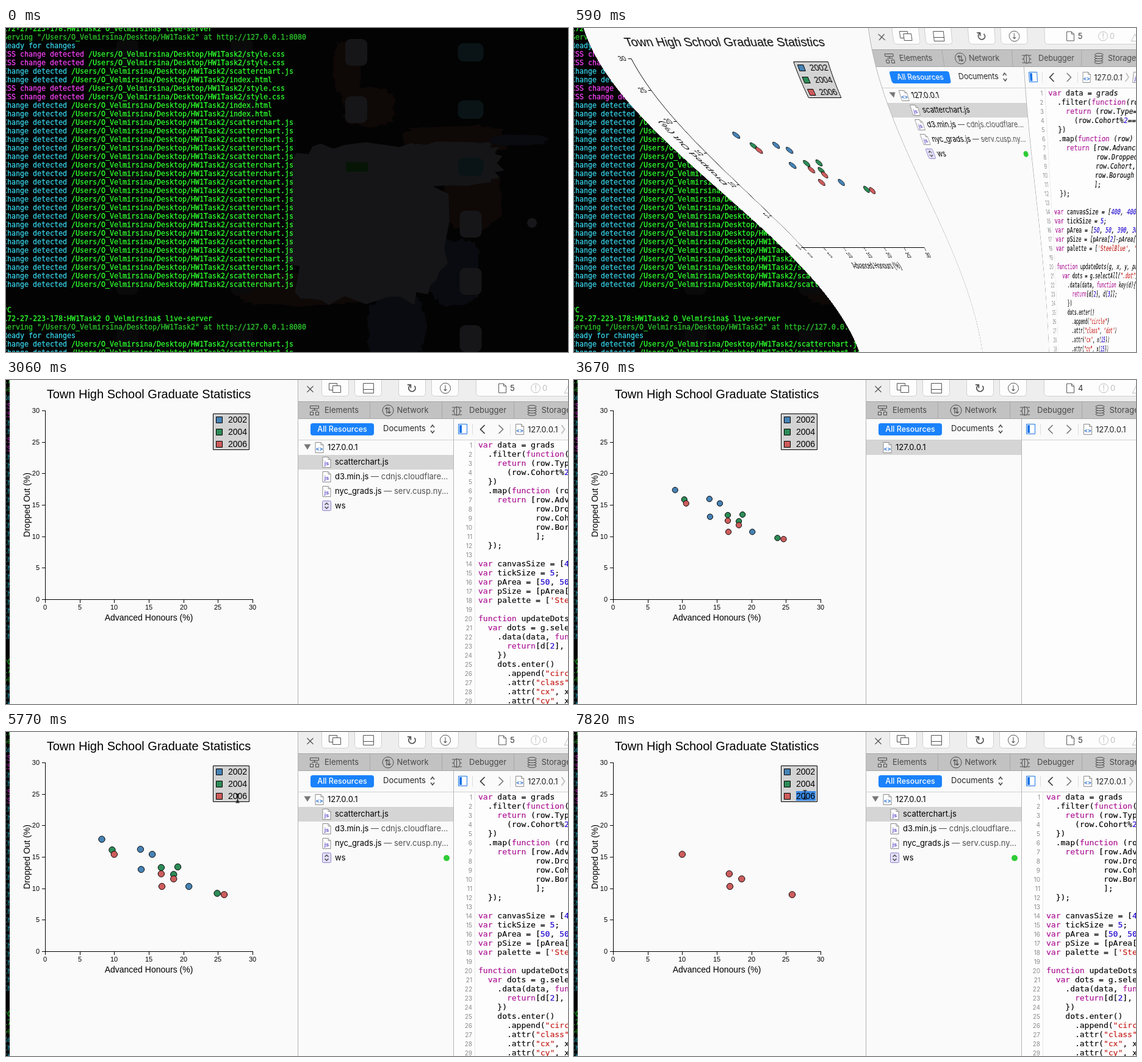
Animation, 921 px wide and 532 px high, one loop 8000 ms. Source, as an HTML page with a canvas:

```html
<!DOCTYPE html>
<html lang="en">
<head>
<meta charset="utf-8">
<title>Scatter chart demo</title>
<style>
html, body { margin: 0; width: 100%; height: 100%; overflow: hidden; background: #000; }
canvas { display: block; width: 921px; height: 532px; }
</style>
</head>
<body>
<canvas id="stage" width="921" height="532"></canvas>
<script>
const W = 921, H = 532, LOOP = 8000;
const LEFT = 6, RIGHT = 1231, DOCK = 812; // window edges and the axis it unfolds from
const SPLIT = 479, CODE_X = 734;          // inspector panes
const HELV = '"Liberation Sans", Arial, sans-serif';
const UI = '13px Inter, sans-serif';
const MONO = '"DejaVu Sans Mono", monospace';
const SIGNS = '"DejaVu Sans", sans-serif';

// Hard changes, in ms
const PEEK = 320, UNFOLD = 590, OPEN = 800, SHADE = 1100;
const RELOAD = 2920, CLEARED = 3210, LISTED = 3970, LOADED = 4120, CONNECTED = 4290;
const FILTER = 5700, SELECTED = 7810;

const stage = document.getElementById('stage').getContext('2d');
const makeLayer = width => {
  const c = document.createElement('canvas');
  c.width = width;
  c.height = H;
  return c.getContext('2d');
};
const terminal = makeLayer(W);
const win = makeLayer(RIGHT);
let g = win;

// ---- drawing helpers ----
function text(str, x, y, font, color = '#000', align = 'left') {
  g.font = font;
  g.fillStyle = color;
  g.textAlign = align;
  g.fillText(str, x, y);
}
// Draws [string, colour] parts one after another
function run(parts, x, y, font, weight = 0) {
  for (const [str, color] of parts) {
    text(str, x, y, font, color);
    if (weight) {
      g.strokeStyle = color;
      g.lineWidth = weight;
      g.strokeText(str, x, y);
    }
    x += g.measureText(str).width;
  }
}
function paint(fill, line, width = 1) {
  if (fill) { g.fillStyle = fill; g.fill(); }
  if (line) { g.strokeStyle = line; g.lineWidth = width; g.stroke(); }
}
function box(x, y, w, h, fill, line, radius = 0) {
  g.beginPath();
  g.roundRect(x, y, w, h, radius);
  paint(fill, line);
}
function disc(x, y, r, fill, line, squash = 1) {
  g.beginPath();
  g.ellipse(x, y, r, r * squash, 0, 0, 7);
  paint(fill, line);
}
function poly(points, line, width = 1, fill) {
  g.beginPath();
  points.forEach(p => g.lineTo(...p));
  paint(fill, line, width);
}
const hline = (x1, x2, y, color) => poly([[x1, y + .5], [x2, y + .5]], color);
const vline = (x, y1, y2, color) => poly([[x + .5, y1], [x + .5, y2]], color);
// Tip points along x by dx, or along y by dy
const chevronX = (x, y, dx, color) => poly([[x - dx, y - 7], [x + dx, y], [x - dx, y + 7]], color, 1.7);
const chevronY = (x, y, dy) => poly([[x - 3, y - dy], [x, y + dy], [x + 3, y - dy]], '#444', 1.4);

// ---- terminal ----
const HOME = '/Users/O_Velmirsina/Desktop/HW1Task2';
const GREEN = '#2eff2e', DIM = '#2cc42c', CYAN = '#36cfe4', PINK = '#f040f0';

function seeded(seed) {
  return () => (seed = seed * 16807 % 2147483647) / 2147483647;
}
const random = seeded(77);

// Rounded block with a ragged outline
function blob(x, y, rx, ry, color) {
  const n = 44, round = v => Math.sign(v) * Math.abs(v) ** .6;
  poly(Array.from({ length: n }, (_, i) => {
    const a = i / n * 2 * Math.PI, r = .88 + .2 * random();
    return [x + rx * r * round(Math.cos(a)), y + ry * r * round(Math.sin(a))];
  }), null, 0, color);
}

function wallpaper() {
  const gray = '#151517', brown = '#0e0807', navy = '#0a0b10';
  box(0, 0, W, H, '#030303');
  blob(560, 65, 24, 45, brown);
  blob(595, 130, 42, 32, brown);
  blob(735, 185, 85, 26, brown);
  blob(765, 275, 48, 55, brown);
  blob(480, 430, 105, 26, brown);
  blob(735, 400, 42, 55, navy);
  blob(640, 490, 48, 50, navy);
  blob(840, 184, 46, 9, navy);
  blob(590, 318, 128, 138, gray);
  blob(730, 222, 82, 36, gray);
  for (let col = 0; col < 4; col++) {
    for (let row = 0; row < 6; row++) {
      if (col === 2 && row > 1) continue;
      const teal = col === 3 && row < 3;
      const w = teal ? 42 : 36, h = teal ? 30 : 44;
      box(199 + 187.5 * col - w / 2, 40 + 94 * row - h / 2, w, h,
        teal ? '#0a1416' : col < 2 ? '#0a0a0b' : '#161618', null, 9);
    }
  }
  box(557, 220, 36, 16, '#061506', null, 3);
  disc(862, 320, 8, '#171719');
}

function paintTerminal() {
  g = terminal;
  wallpaper();
  const put = (row, ...parts) => run(parts, -5, 5 + 14 * row, '11.63px ' + MONO, .3);
  const change = (row, file) => put(row,
    file === 'style.css' ? ['CSS change detected ', PINK] : ['Change detected ', CYAN],
    [`${HOME}/${file}`, GREEN]);
  const session = (row, files) => {
    put(row, ['172-27-223-178:HW1Task2 O_Velmirsina$ live-server', GREEN]);
    put(row + 1, [`Serving "${HOME}" at http://127.0.0.1:8080`, DIM]);
    put(row + 2, ['Ready for changes', CYAN]);
    files.forEach((file, i) => change(row + 3 + i, file));
  };
  const css = 'style.css', js = 'scatterchart.js', html = 'index.html';
  session(0, [css, css, js, html, css, css, html, html, ...Array(20).fill(js)]);
  put(33, ['^C', GREEN]);
  session(34, [js, js]);
}

// ---- chart ----
const scaleX = v => 64 + v * 34 / 3;
const scaleY = v => 360 - v * 31 / 3;
const SERIES = [
  { year: '2002', color: 'steelblue', data: [[8.2, 17.8], [13.8, 16.2], [15.5, 15.4], [13.9, 13], [20.8, 10.3]] },
  { year: '2004', color: 'seagreen', data: [[9.7, 16.1], [16.8, 13.3], [19.2, 13.4], [18.6, 12.2], [24.9, 9.2]] },
  { year: '2006', color: 'indianred', data: [[10, 15.4], [16.8, 12.3], [18.6, 11.5], [16.9, 10.3], [25.9, 9]] }
];
const MIDDLE = [15, 13.9];

const progress = (t, from, to) => Math.min(1, Math.max(0, (t - from) / (to - from)));
const cubic = u => u < .5 ? 4 * u ** 3 : 1 - 4 * (1 - u) ** 3;
const mix = (a, b, k) => a + (b - a) * k;

// 0: gathered in the middle with no radius, 1: in place
function spread(t, year) {
  if (t < RELOAD) return 1;
  if (t < FILTER) return cubic(progress(t, 2965, 3965));
  return year === '2006' ? 1 : 1 - cubic(progress(t, FILTER, FILTER + 620));
}

function chart(t, frame) {
  const label = '14px ' + HELV, small = '11px ' + HELV;
  text('Town High School Graduate Statistics', 234, 30, '20px ' + HELV, '#000', 'center');
  vline(64, 50, 361, '#000');
  hline(64, 405, 360, '#000');
  for (let v = 0; v <= 30; v += 5) {
    const x = Math.round(scaleX(v)), y = Math.round(scaleY(v));
    vline(x, 360, 366, '#000');
    hline(59, 64, y, '#000');
    text(v, x, 377, small, '#000', 'center');
    text(v, 55, y + 4, small, '#000', 'right');
  }
  text('Advanced Honours (%)', 234, 395, label, '#000', 'center');
  g.save();
  g.translate(39, 205);
  g.rotate(-Math.PI / 2);
  text('Dropped Out (%)', 0, 0, label, '#000', 'center');
  g.restore();

  box(339.5, 55.5, 59, 59, '#d3d3d3', '#000');
  if (t >= SELECTED) box(364, 97, 32, 16, '#3a8ae6');
  SERIES.forEach(({ year, color, data }, i) => {
    box(344.5, 60.5 + 20 * i, 10, 10, color, '#000');
    text(year, 364, 70 + 20 * i, label);
    const k = spread(frame, year);
    if (k < .01) return;
    for (const [x, y] of data) {
      disc(scaleX(mix(MIDDLE[0], x, k)), scaleY(mix(MIDDLE[1], y, k)), 5.2 * k, color, '#000');
    }
  });
}

// ---- inspector ----
const CODE = `var data = grads
  .filter(function(row) {
    return (row.Type==1) &&
      (row.Cohort%2==0);
  })
  .map(function (row) {
    return [row.Advanced,
            row.Dropped,
            row.Cohort,
            row.Borough
            ];
  });

var canvasSize = [400, 400];
var tickSize = 5;
var pArea = [50, 50, 390, 360];
var pSize = [pArea[2]-pArea[0], pArea[3]];
var palette = ['SteelBlue', 'SeaGreen'];

function updateDots(g, x, y, palette) {
  var dots = g.selectAll(".dot")
    .data(data, function key(d){
      return[d[2], d[3]];
    })
    dots.enter()
      .append("circle")
      .attr("class", "dot")
      .attr("cx", x(15))
      .attr("cy", x(15))`.split('\n');
const TOKENS = /(\b(?:var|function|return)\b|"[^"]*"|'[^']*'|\b\d+\b)/;
const tokenColor = s => /^(var|function|return)$/.test(s) ? '#aa0d91'
  : /^["']/.test(s) ? '#c41a16' : /^\d+$/.test(s) ? '#1c00cf' : '#000';

function code() {
  vline(768, 99, H, '#e6e6e6');
  CODE.forEach((line, i) => {
    const y = 111 + 15 * i;
    text(i + 1, 764, y, '10px Inter, sans-serif', '#8a8a8a', 'right');
    run(line.split(TOKENS).map(s => [s, tokenColor(s)]), 774, y, '13px ' + MONO, .15);
  });
}

function page(x, y, w, h, fold, line) {
  const l = x - w / 2, r = x + w / 2, top = y - h / 2, bottom = y + h / 2;
  poly([[l, top], [r - fold, top], [r, top + fold], [r, bottom], [l, bottom], [l, top]], line, 1, '#fff');
  poly([[r - fold, top], [r - fold, top + fold], [r, top + fold]], line);
}
function fileIcon(x, y, mark) {
  page(x, y, 13, 17, 4, '#8c8c8c');
  text(mark, x, y + 5, 'bold 9px Inter, sans-serif', mark === 'js' ? '#6b55c8' : '#2a6fd0', 'center');
}

function toolbar(count) {
  const ink = '#555', pale = '#c0c0c0';
  box(SPLIT, 0, RIGHT, 36, '#eeeeee');
  [1, -1].forEach(d => poly([[493.5, 15 - 5 * d], [503.5, 15 + 5 * d]], ink, 1.3));
  for (const x of [517, 571, 643, 697]) box(x + .5, -8.5, 44, 35, '#fdfdfd', '#cfcfcf', 5);
  box(770.5, -8.5, 380, 35, '#fdfdfd', '#cfcfcf', 5);
  box(529.5, 5.5, 13, 11, null, ink);
  box(535.5, 9.5, 13, 11, '#fdfdfd', ink);
  box(585.5, 5.5, 17, 16, null, ink);
  hline(585, 603, 15, ink);
  text('↻', 665, 21, '21px ' + SIGNS, ink, 'center');
  disc(720, 13.5, 8.5, null, ink);
  text('↓', 720, 18, '13px ' + SIGNS, ink, 'center');
  page(813.5, 13.5, 12, 15, 4, ink);
  text(count, 826, 18, UI, '#333');
  disc(868, 13.5, 7.5, null, pale);
  text('!', 868, 18, UI, pale, 'center');
  text('0', 879, 18, UI, pale);
  text('△', 921, 20, '17px ' + SIGNS, pale, 'center');
}

function tabs() {
  const ink = '#484848', y = 50;
  box(SPLIT, 36, RIGHT, 28, '#c2c2c2');
  [35, 63].forEach(edge => hline(SPLIT, RIGHT, edge, '#a8a8a8'));
  ['Elements', 'Network', 'Debugger', 'Storage', 'Console'].forEach((name, i) => {
    text(name, 522 + 118.5 * i, 54, UI, ink);
    vline(596 + 118 * i, 36, 64, '#a8a8a8');
  });
  box(498.5, 42.5, 14, 4, null, ink);
  [498.5, 507.5].forEach(x => box(x, 52.5, 5, 5, null, ink));
  vline(505, 46, 50, ink);
  hline(501, 511, 49, ink);
  disc(626, y, 9, null, ink);
  text('⇅', 626, y + 5, '14px ' + SIGNS, ink, 'center');
  for (let leg = -1; leg <= 1; leg++) {
    poly([[731, y + 1 + 6 * leg], [747, y + 1 + 6 * leg]], ink);
  }
  disc(739, y + 1, 5, '#c2c2c2', ink, 1.4);
  vline(738, y - 6, y + 8, ink);
  for (let ring = 3; ring >= 0; ring--) disc(862, 44 + 4 * ring, 7, '#c2c2c2', ink, .35);
}

function navigation(full) {
  box(SPLIT, 64, RIGHT, 34, '#fafafa');
  box(499, 71, 104, 20, '#1a82fb', null, 4);
  text('All Resources', 551, 85, '500 12.5px Inter, sans-serif', '#fff', 'center');
  text('Documents', 618, 84, UI, '#222');
  chevronY(699, 76, -2);
  chevronY(699, 85, 2);
  box(741.5, 72.5, 14, 16, '#fff', '#1a75e8');
  box(743, 74, 4, 13, '#1a75e8');
  [764, 826].forEach(x => vline(x, 72, 90, '#ddd'));
  chevronX(781, 81, -3.5, full ? '#333' : '#777');
  chevronX(811, 81, 3.5, '#777');
  fileIcon(842, 81, '<>');
  text('127.0.0.1', 855, 86, UI, '#222');
  if (full) {
    chevronX(913, 81, 2.5, '#bbb');
    fileIcon(930, 81, 'js');
  }
}

function tree(full, connected) {
  box(SPLIT, 98, 254, H, '#fafafa');
  box(SPLIT, full ? 123 : 99, 254, 24, '#d5d5d5');
  fileIcon(513.5, 111, '<>');
  text('127.0.0.1', 527, 115, UI, '#000');
  if (!full) return;
  poly([[488.5, 105.5], [499.5, 105.5], [494, 114.5]], null, 0, '#777');
  [['scatterchart.js'], ['d3.min.js', ' — cdnjs.cloudflare...'], ['nyc_grads.js', ' — serv.cusp.ny...'], ['ws']]
    .forEach(([name, host = ''], i) => {
      const y = 139 + 24 * i;
      if (name !== 'ws') fileIcon(525.5, y - 4, 'js');
      run([[name, '#000'], [host, '#505050']], 539, y, UI);
    });
  box(518.5, 198.5, 14, 16, '#e4e0fa', '#8b80c4', 2);
  chevronY(525.5, 203.5, -1.5);
  chevronY(525.5, 209.5, 1.5);
  if (connected) disc(722, 207, 5, '#2fcb36');
}

function paintWindow(t, frame) {
  const listed = t < CLEARED || t >= LISTED;
  g = win;
  box(LEFT, 0, RIGHT, H, '#fafafa');
  chart(t, frame);
  toolbar(listed ? 5 : 4);
  tabs();
  navigation(listed);
  tree(listed, t < RELOAD || t >= CONNECTED);
  box(CODE_X, 99, RIGHT, H, '#fdfdfd');
  if (t < CLEARED || t >= LOADED) code();
  vline(SPLIT - 1, 0, H, '#b4b4b4');
  vline(CODE_X - 1, 64, H, '#b4b4b4');
  hline(SPLIT, RIGHT, 98, '#d0d0d0');
}

// ---- unfolding from the dock: each row is narrowed towards one axis ----
function unfold(top, scale) {
  for (let y = top; y < H; y++) {
    const s = scale(y);
    stage.drawImage(win.canvas, LEFT, y - top, RIGHT - LEFT, 1,
      DOCK - (DOCK - LEFT) * s, y, (RIGHT - LEFT) * s, 1);
  }
}

// ---- pointer: leaves at the top right, returns to the legend, then drifts there ----
function arrow(x, y) {
  poly([[0, 0], [0, 15], [4, 11.5], [6, 17], [8.5, 16], [6, 11], [11, 11], [0, 0]]
    .map(p => [x + p[0], y + p[1]]), '#fff', 1, '#000');
}
function caret(x, y) {
  poly([[x, y - 7], [x, y + 7]], '#111', 1.2);
  [-7, 7].forEach(end => poly([[x - 3, y + end], [x + 3, y + end]], '#111', 1.2));
  poly([[x - 2, y + 4], [x + 2, y + 4]], '#111', 1.2);
}
function pointer(t) {
  g = stage;
  if (t >= 1860 && t < 2310) {
    const k = progress(t, 1860, 2310);
    arrow(mix(905, 833, k), mix(190, -20, k));
  } else if (t >= 4250 && t < 5000) {
    const k = progress(t, 4250, 4880);
    arrow(mix(404, 379, k), mix(190, 112, k));
  } else if (t >= 5000) {
    const k = progress(t, 6500, 7370), sway = Math.sin(Math.PI * k);
    caret(379.5 - k + 4 * sway, 109 - 6 * k - 6 * sway);
  }
}

// ---- timeline ----
const PERIOD = 148;
const sample = t => RELOAD + Math.floor((t - RELOAD) / PERIOD) * PERIOD;

function render(t) {
  const frame = sample(t);
  stage.drawImage(terminal.canvas, 0, 0);
  if (t < PEEK) return;
  paintWindow(t, frame);
  if (t < UNFOLD) unfold(470, y => .16 - (y - 470) * .0008);
  else if (t < OPEN) unfold(0, y => 1 - .294 * (1 - Math.cos(Math.PI * (y + 60) / 660)));
  else {
    stage.fillStyle = `rgba(0,0,0,${t < SHADE ? .2 : .35})`;
    stage.fillRect(0, 0, LEFT, H);
    stage.drawImage(win.canvas, LEFT, 0, W - LEFT, H, LEFT, 0, W - LEFT, H);
    pointer(frame);
  }
}

stage.imageSmoothingQuality = 'high';
paintTerminal();
const start = performance.now();
function tick() {
  render((performance.now() - start) % LOOP);
  requestAnimationFrame(tick);
}
tick();
</script>
</body>
</html>
```
